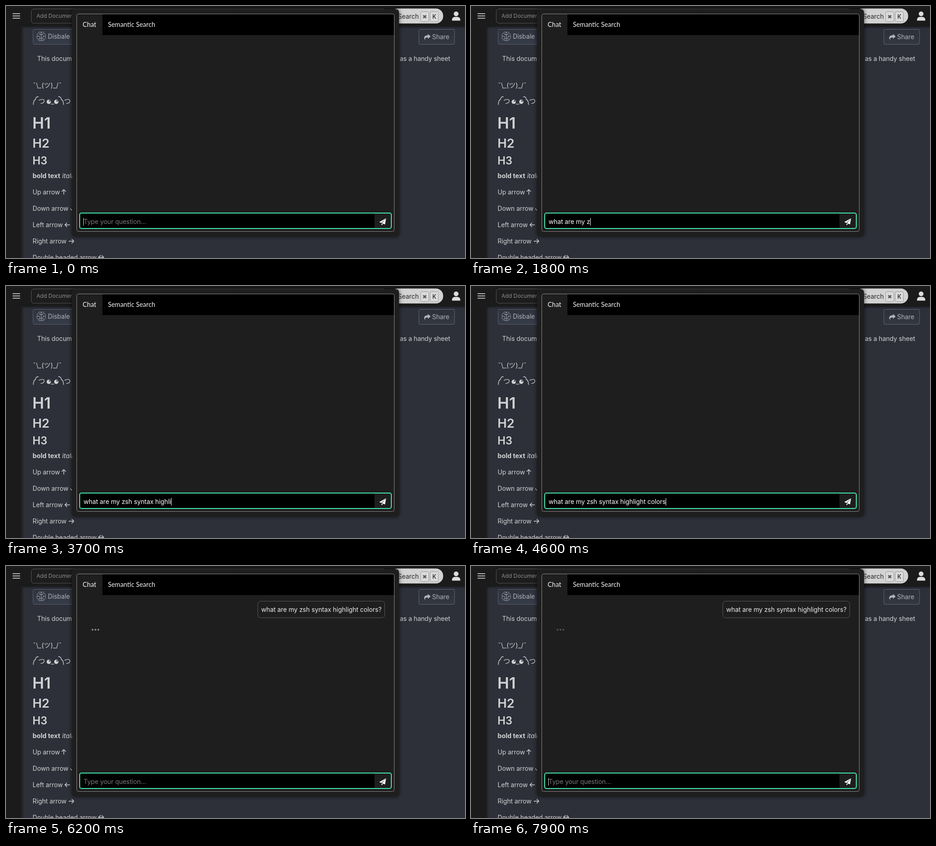
An HTML page with a canvas that plays this animation: 1009x555 px, repeating every 8 s.

```html
<!DOCTYPE html>
<html lang="en">
<head>
<meta charset="utf-8">
<title>Chat dialog</title>
<style>
  html, body { margin: 0; width: 100%; height: 100%; overflow: hidden; background: #1b1b1c; }
  canvas { display: block; width: 1009px; height: 555px; }
</style>
</head>
<body>
<canvas id="stage"></canvas>
<script>
const W = 1009, H = 555, LOOP = 8000, SENT = 5300;
const PAGE = '#2d3039', INK = '#d2d2d4';
const SANS = 'Inter, "Noto Sans CJK JP", "DejaVu Sans", sans-serif';
const QUESTION = 'what are my zsh syntax highlight colors?';
// Time in tenths of a second at which each character appears
const KEYS = [2, 5, 6, 6, 8, 9, 10, 11, 11, 12, 14, 15, 18, 19, 19, 20, 22, 23, 24, 25,
  26, 27, 28, 29, 31, 32, 34, 35, 37, 38, 39, 40, 41, 42, 44, 45, 45, 46, 46, 50];

const canvas = document.getElementById('stage');
const ctx = canvas.getContext('2d');
const ratio = window.devicePixelRatio || 1;
canvas.width = W * ratio;
canvas.height = H * ratio;

function text(str, x, y, color, { size = 13.9, weight = 400, style = '', family = SANS, align = 'left' } = {}) {
  ctx.font = `${style} ${weight} ${size}px ${family}`;
  ctx.letterSpacing = size === 13.9 ? '-0.05px' : '0px';
  ctx.textAlign = align;
  ctx.fillStyle = color;
  ctx.fillText(str, x, y);
  return ctx.measureText(str).width;
}

function rect(x, y, w, h, color) {
  ctx.fillStyle = color;
  ctx.fillRect(x, y, w, h);
}

function box(x, y, w, h, r, fill, stroke, line = 1) {
  ctx.beginPath();
  ctx.roundRect(x, y, w, h, r);
  if (fill) { ctx.fillStyle = fill; ctx.fill(); }
  if (stroke) { ctx.strokeStyle = stroke; ctx.lineWidth = line; ctx.stroke(); }
}

function disc(x, y, r, color) {
  ctx.fillStyle = color;
  ctx.beginPath();
  ctx.arc(x, y, r, 0, Math.PI * 2);
  ctx.fill();
}

function path(d, color, line) {
  const p = new Path2D(d);
  if (line) {
    ctx.strokeStyle = color;
    ctx.lineWidth = line;
    ctx.lineCap = ctx.lineJoin = 'round';
    ctx.stroke(p);
  } else {
    ctx.fillStyle = color;
    ctx.fill(p);
  }
}

function fade(x0, y0, x1, y1, from, to) {
  const g = ctx.createLinearGradient(x0, y0, x1, y1);
  g.addColorStop(0, from);
  g.addColorStop(1, to);
  return g;
}

function arrow(x, y, angle, length, both) {
  ctx.save();
  ctx.translate(x, y);
  ctx.rotate(angle);
  const e = length / 2;
  let d = `M${-e} 0H${e}M${e - 4.2} -4.2L${e} 0L${e - 4.2} 4.2`;
  if (both) d += `M${4.2 - e} -4.2L${-e} 0L${4.2 - e} 4.2`;
  path(d, INK, 1.4);
  ctx.restore();
}

function drawNav() {
  rect(0, 0, W, 45, '#1b1b1c');
  for (const y of [16, 21, 26]) rect(14.5, y, 16.5, 1.7, '#cfcfcf');
  box(55.5, 6.5, 780, 31.5, 6, '#1d1d1e', '#555557');
  text('Add Documents', 67, 26, '#8d8d8f', { size: 12 });
  box(845, 5.5, 116, 33, 16, '#d3d3d3');
  text('Search', 861.5, 28, '#262626');
  for (const x of [911.5, 932.5]) box(x, 12.5, 18, 22, 3, '#dadada', '#98989a');
  text('⌘', 920.5, 27, '#222', { size: 10, weight: 600, align: 'center' });
  text('K', 941.5, 28, '#222', { size: 12.5, weight: 500, align: 'center' });
  disc(989.5, 17.3, 5.2, '#dcdcdc');
  path('M980.5 32.3V30C980.5 26 984 24 987 24H992C995 24 998.5 26 998.5 30V32.3Z', '#dcdcdc');
}

function drawButtons() {
  box(59.5, 51.5, 130, 33, 3, fade(0, 51, 0, 85, '#2f333d', '#363c49'), '#565d6d');
  const c = '#a5a7ac';
  path('M77.5 58V76.5M77 58C74 56 71 58 71.5 60.5C68.5 61 67.5 64 69 66C67 68 68 72 70.5 72.5C70.5 76 75 78 77 75.5' +
    'M78 58C81 56 84 58 83.5 60.5C86.5 61 87.5 64 86 66C88 68 87 72 84.5 72.5C84.5 76 80 78 78 75.5' +
    'M77 63H74V60.5M69.5 66.5H73.5V69M77 71H73.5V74M78 63H81V60.5M85.5 66.5H81.5V69M78 71H81.5V74', c, 1);
  text('Disbale', 92, 72, '#aeb0b5');
  box(907.5, 51.5, 78.5, 33, 3, fade(0, 51, 0, 85, '#2d303a', '#333843'), '#626672');
  path('M927.5 61.5L933.5 67L927.5 72.5V69.3C923 69.2 920.5 70.5 921.5 75C917.5 71 918.5 64.7 927.5 64.6Z', '#b2b3b8');
  text('Share', 936.8, 73, '#b2b3b8');
}

function drawDocument() {
  text('This document', 68.5, 121, INK);
  text('as a handy sheet', 976.5, 121, INK, { align: 'right' });

  text('¯\\_(ツ)_/¯', 59, 179.5, INK, { size: 14.7 });
  path('M60 217C60.5 209 62 206.5 65 206C64.5 202 67 200 71 199.5', INK, 1.4);
  path('M126.5 217C126 209 124.5 206.5 121.5 206C122 202 119.5 200 115.5 199.5', INK, 1.4);
  for (const x of [71, 127.5]) text('つ', x, 214.5, INK, { size: 15, family: '"Noto Sans CJK JP", sans-serif' });
  for (const x of [94, 110.5]) {
    disc(x, 211, 4.7, INK);
    path(`M${x + .4} 210.6V207.4A3.2 3.2 0 0 1 ${x + 3.6} 210.6Z`, PAGE);
  }
  rect(98.5, 215.5, 7.5, 1.2, INK);

  text('H1', 58, 270, INK, { size: 34.5, weight: 600 });
  text('H2', 58.2, 311.5, INK, { size: 27.4, weight: 600 });
  text('H3', 58.2, 349, INK, { size: 23.7, weight: 600 });
  text('bold text', 58.5, 378.5, INK, { size: 14.2, weight: 700 });
  text('italic', 123.5, 378.5, INK, { style: 'italic' });

  ['Up arrow', 'Down arrow', 'Left arrow', 'Right arrow', 'Double headed arrow']
    .forEach((line, i) => text(line, 58.5, 415 + i * 36, INK));
  arrow(127, 409.5, -Math.PI / 2, 10.5);
  arrow(145.8, 445.5, Math.PI / 2, 10.5);
  arrow(134.8, 482, Math.PI, 10.5);
  arrow(143.8, 518, 0, 10.5);
  arrow(209, 553.5, 0, 11.5, true);
}

function drawPage() {
  rect(0, 0, W, H, PAGE);
  drawButtons();
  drawDocument();
  rect(0, 45, 32, H, '#1b1b1c');
  rect(32, 45, 8, H, fade(32, 0, 40, 0, '#1b1b1c', 'rgba(27,27,28,0)'));
  rect(34, 45, W, 5, fade(0, 45, 0, 50, 'rgba(20,20,22,.6)', 'rgba(20,20,22,0)'));
  drawNav();
}

function drawModal() {
  ctx.save();
  ctx.shadowColor = 'rgba(0,0,0,.65)';
  ctx.shadowBlur = 10 * ratio;
  box(145, 7, 719, 500.5, 7, '#1e1e1e');
  ctx.restore();
  box(155.5, 17.5, 698, 479, 4, '#1e1e1e');
  rect(212, 18, 641, 46, '#000');
  box(155.5, 17.5, 698, 479, 4, null, '#8e8e8e');
  const tab = { size: 14.4, family: 'Lato, sans-serif' };
  text('Chat', 168.5, 46, '#f2f2f2', tab);
  text('Semantic Search', 224, 46, '#f2f2f2', tab);
}

function drawInput(t) {
  box(162, 456, 685, 34, 4, '#000');
  rect(810, 457, 36, 32, '#1e1e1e');
  box(162, 456, 685, 34, 4, null, '#45e9ae', 2);
  path('M820.5 475.8L835.5 467.5L825 478Z', '#fff');
  path('M826.3 478.6L835.5 467.5L833.2 481Z', '#fff');
  path('M825.3 479.3L828.6 480.6L825.6 483Z', '#fff');

  const count = t < SENT ? KEYS.filter(k => k * 100 <= t).length : 0;
  if (count) {
    const w = text(QUESTION.slice(0, count), 170.5, 480, '#fff');
    rect(Math.round(170.5 + w), 467, 1, 16.5, '#fff');
    return;
  }
  text('Type your question...', 170.8, 480, '#7b7b7b');
  const caretOn = t < SENT || Math.floor((t - 5200) / 500) % 2 === 1;
  if (caretOn) rect(170, 467, 1, 16.5, '#e8e8e8');
}

function drawChat(t) {
  if (t < SENT) return;
  box(553.5, 77.5, 279, 36.5, 6, '#1e1e1e', '#595959');
  text(QUESTION, 561, 101, '#ededed');

  // Dots dip to 40% opacity and back once a second
  const phase = ((t - SENT) / 1000) % 1;
  const dip = 1 - Math.abs(phase * 2 - 1);
  ctx.globalAlpha = 1 - 0.6 * dip * dip * (3 - 2 * dip);
  for (let i = 0; i < 3; i++) disc(190.1 + i * 6.4, 140.3, 2.1, '#888');
  ctx.globalAlpha = 1;
}

function frame() {
  const t = performance.now() % LOOP;
  ctx.setTransform(ratio, 0, 0, ratio, 0, 0);
  drawPage();
  drawModal();
  drawChat(t);
  drawInput(t);
  requestAnimationFrame(frame);
}
frame();
</script>
</body>
</html>
```
